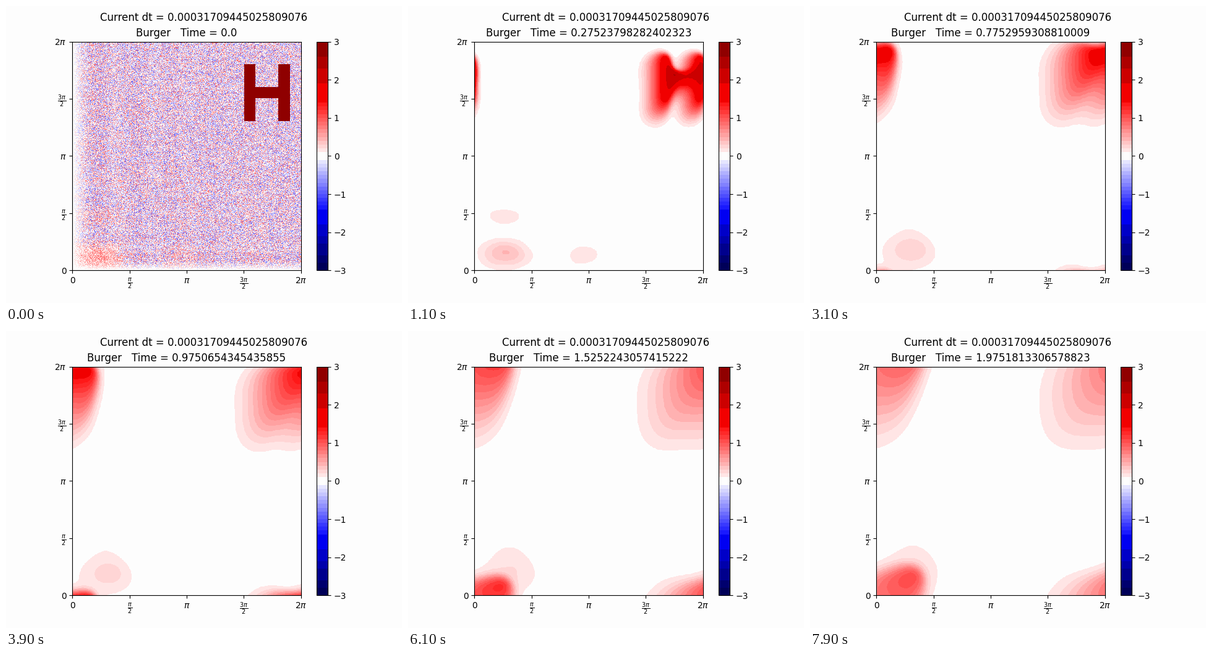
Recreate the animation shown at these times as a matplotlib script. Size 640 by 480 pixels, loop 8 s.

```python
import numpy as np
import matplotlib.pyplot as plt
from matplotlib.animation import FuncAnimation
from matplotlib.colors import ListedColormap

FRAMES, INTERVAL = 80, 100
PAPER = "#fdfdfd"

# Physics: u_t + u (u_x + u_y) = NU * laplacian(u), periodic in both directions
N = 500                       # display grid
M, CUT = 192, 64              # solver grid and highest kept mode
NU = 0.05
DT = 0.00031709445025809076
SAVE_EVERY = 0.025
SUBSTEPS = 8
DX = 2 * np.pi / (N - 1)


def initial_field():
    rng = np.random.default_rng(4)
    x = np.linspace(0, 2 * np.pi, N)
    rx = rng.uniform(0, np.pi, (N, N))
    ry = rng.uniform(0, 2 * np.pi, (N, N))
    u = np.sin(rx * x[None, :]) * np.sin(ry * x[:, None])
    u[325:450, 375:400] = 3
    u[325:450, 450:475] = 3
    u[375:400, 400:450] = 3
    return u


def resize(spec, n):
    """Carry the low modes of a half spectrum over to an n x n grid."""
    out = np.zeros((n, n // 2 + 1), complex)
    out[:CUT + 1, :CUT + 1] = spec[:CUT + 1, :CUT + 1]
    out[-CUT:, :CUT + 1] = spec[-CUT:, :CUT + 1]
    return out * (n / len(spec)) ** 2


def save_times():
    times, t = [], 0.0
    for n in range(FRAMES):
        while t < n * SAVE_EVERY:
            t += DT
        times.append(t)
    return times


def solve(u0, times):
    """Pseudo-spectral RK4 with an integrating factor for the viscosity."""
    base = 2 * np.pi / (N * DX)
    my = np.fft.fftfreq(M, 1 / M)[:, None]
    mx = np.arange(M // 2 + 1)[None, :]
    keep = (abs(my) <= CUT) & (mx <= CUT)
    flux = -0.5j * base * (mx + my) * keep
    k2 = base ** 2 * (mx ** 2 + my ** 2)

    def rhs(s):
        u = np.fft.irfft2(s)
        return flux * np.fft.rfft2(u * u)

    s = resize(np.fft.rfft2(u0), M)
    result = [s]
    for t0, t1 in zip(times, times[1:]):
        h = (t1 - t0) / SUBSTEPS
        e = np.exp(-NU * k2 * h / 2)
        for _ in range(SUBSTEPS):
            a = h * rhs(s)
            b = h * rhs(e * (s + a / 2))
            c = h * rhs(e * s + b / 2)
            d = h * rhs(e * (e * s + c))
            s = e * e * s + (e * e * a + 2 * e * (b + c) + d) / 6
        result.append(s)
    return result


def banded_map():
    """Seismic in steps of 0.1, with wider steps in the dark ends."""
    seismic = plt.get_cmap("seismic")
    red = [1.4, 1.9, 2.3, 2.6, 3.0]
    blue = [1.4, 1.8, 2.1, 2.3, 2.6, 2.8, 3.0]
    colors = []
    for v in np.linspace(-2.95, 2.95, 60):
        if abs(v) < 0.1:
            colors.append(PAPER)
            continue
        edges = red if v > 0 else blue
        for lo, hi in zip(edges, edges[1:]):
            if lo < abs(v) < hi:
                v = np.sign(v) * (lo + hi) / 2
                break
        colors.append(seismic((v + 3) / 6))
    return ListedColormap(colors)


start = initial_field()
times = save_times()
spectra = solve(start, times)

fig, ax = plt.subplots(figsize=(6.4, 4.8), dpi=100, facecolor=PAPER)
ax.set_facecolor(PAPER)
fig.suptitle(f"Current dt = {DT}")
title = ax.set_title("Burger   Time = 0.0")

lo, hi = -DX / 2, 2 * np.pi + DX / 2
image = ax.imshow(start, cmap=banded_map(), vmin=-3, vmax=3, origin="lower",
                  extent=(lo, hi, lo, hi), interpolation="nearest")
bar = fig.colorbar(image, ax=ax)
bar.set_ticks(range(-3, 4))

ticks = np.arange(5) * np.pi / 2
labels = ["0", r"$\frac{\pi}{2}$", r"$\pi$", r"$\frac{3\pi}{2}$", r"$2\pi$"]
ax.set_xticks(ticks, labels)
ax.set_yticks(ticks, labels)
ax.set_xlim(0, 2 * np.pi)
ax.set_ylim(0, 2 * np.pi)


def update(n):
    u = start if n == 0 else np.fft.irfft2(resize(spectra[n], N))
    image.set_data(u)
    title.set_text(f"Burger   Time = {times[n]}")
    return image, title


anim = FuncAnimation(fig, update, frames=FRAMES, interval=INTERVAL,
                     repeat=True, repeat_delay=0, blit=False)
plt.show()
```
